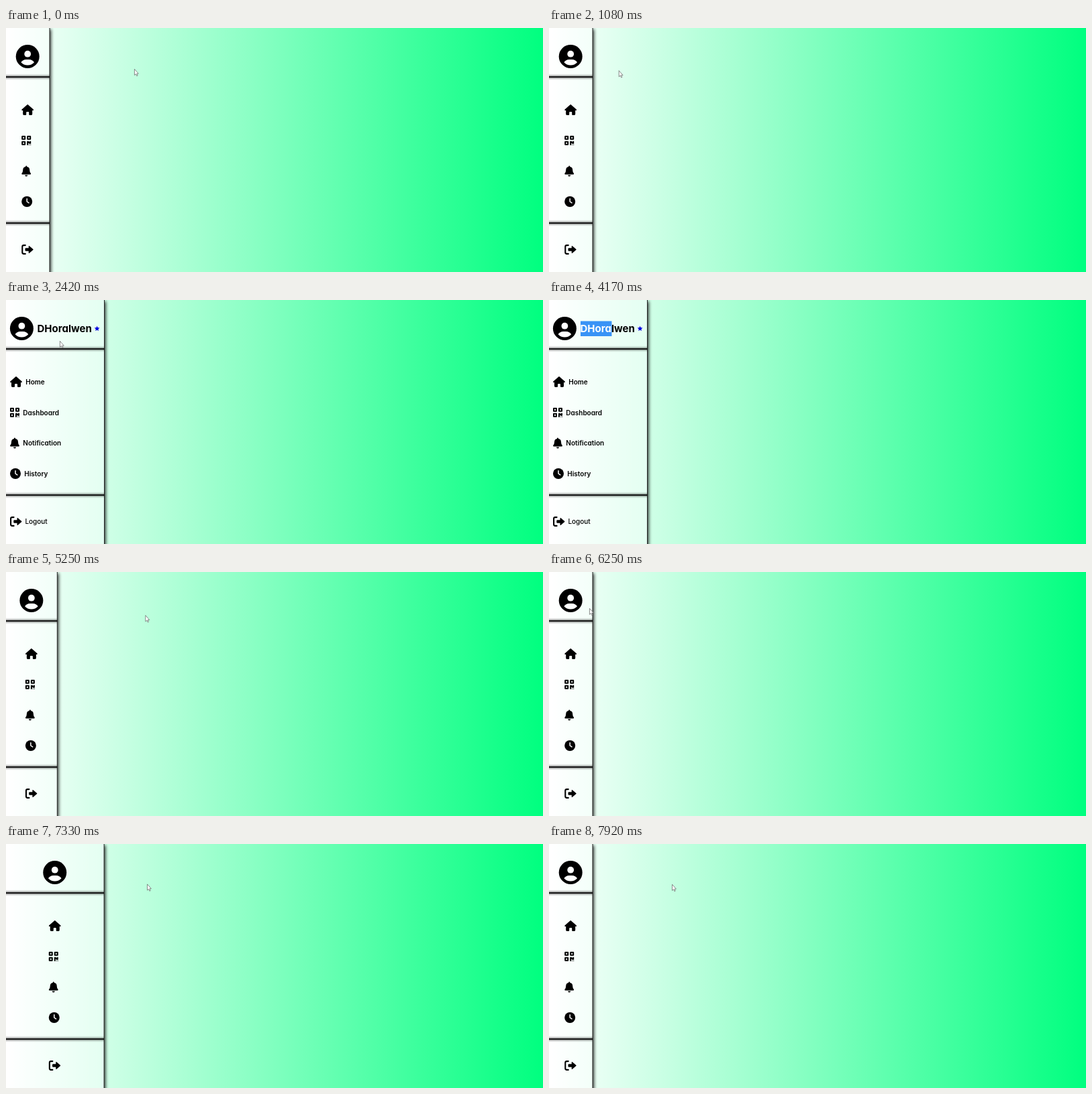
Animation, 800 px wide and 364 px high, one loop 8000 ms. Source, as an HTML page:

```html
<!DOCTYPE html>
<html lang="en">
<head>
<meta charset="utf-8">
<title>Sidebar</title>
<style>
  html, body { margin: 0; width: 100%; height: 100%; overflow: hidden; }
  svg { display: block; width: 100vw; height: 100vh; }
  text { font-family: Inter, "Open Sans", sans-serif; font-size: 10px; font-weight: 600; font-feature-settings: "cv11"; }
  #name { font-size: 15px; font-weight: 700; }
</style>
</head>
<body>
<svg viewBox="0 0 800 364">
  <defs>
    <linearGradient id="mint"><stop stop-color="#fff"/><stop offset="1" stop-color="#00ff7f"/></linearGradient>
    <filter id="soft" filterUnits="userSpaceOnUse" x="-20" y="-20" width="840" height="404"><feGaussianBlur stdDeviation="2.6"/></filter>
    <filter id="thin" filterUnits="userSpaceOnUse" x="-20" y="-20" width="840" height="404"><feGaussianBlur stdDeviation="1.6"/></filter>
    <clipPath id="outside"><rect id="outer" width="800" height="364"/></clipPath>
    <clipPath id="inside"><rect id="inner" height="364"/></clipPath>
  </defs>

  <rect width="800" height="364" fill="url(#mint)"/>
  <g clip-path="url(#outside)">
    <rect id="shade" x="-10" y="2" height="380" opacity=".85" filter="url(#soft)"/>
  </g>
  <rect id="panel" height="364" fill="#fff" fill-opacity=".4"/>
  <rect id="edge" width="1" height="364" fill="#222"/>
  <g id="rules" clip-path="url(#inside)"></g>

  <g id="icons">
    <g transform="translate(0 25)">
      <circle cx="17.5" cy="17.5" r="17.5"/>
      <g fill="#fff">
        <circle cx="17.5" cy="13.7" r="4.9"/>
        <path d="M7.7 26.3C9.2 23.6 12.1 21.9 15.3 21.9H19.7C22.9 21.9 25.8 23.6 27.3 26.3C24.9 28.9 21.4 30.6 17.5 30.6S10.1 28.9 7.7 26.3Z"/>
      </g>
    </g>
    <g transform="translate(0 114)">
      <path d="M8.3 .4Q9 -.2 9.7 .4L17.7 7.5Q18.4 9 17 9H16V14.6Q16 16 14.6 16H12Q11 16 11 15V12Q11 11 10 11H8Q7 11 7 12V15Q7 16 6 16H3.4Q2 16 2 14.6V9H1Q-.4 9 .3 7.5Z"/>
    </g>
    <g transform="translate(0 160.8)">
      <path fill="none" stroke="#000" stroke-width="2" stroke-linejoin="round" d="M1 1h4v4h-4zM9 1h4v4h-4zM1 9h4v4h-4z"/>
      <path d="M8 8h3v1h1V8h2v4h-3v-1h-1v3H8zM11 13h1v1h-1zM13 13h1v1h-1z"/>
    </g>
    <g transform="translate(0 205.4)">
      <path d="M7 0Q8 0 8 1V1.6Q12 2.4 12 6.5Q12 9.5 13.7 11.3Q14.5 13 13 13H1Q-.5 13 .3 11.3Q2 9.5 2 6.5Q2 2.4 6 1.6V1Q6 0 7 0ZM5 14H9A2 2 0 0 1 5 14Z"/>
    </g>
    <g transform="translate(0 251)">
      <circle cx="8" cy="8" r="8"/>
      <path d="M8 3.7V8L10.8 9.9" fill="none" stroke="#fff" stroke-width="1.5" stroke-linecap="round" stroke-linejoin="round"/>
    </g>
    <g transform="translate(0 323)">
      <path fill="none" stroke="#000" stroke-width="2.1" stroke-linecap="round" d="M5.6 1.1H3.2Q1.1 1.1 1.1 3.2V11.8Q1.1 13.9 3.2 13.9H5.6"/>
      <path d="M6.3 5.2H10.5V2.9Q10.5 1.4 11.7 2.3L17.2 6.9Q17.8 7.5 17.2 8.1L11.7 12.7Q10.5 13.6 10.5 12.1V9.8H6.3Q5.3 9.8 5.3 8.8V6.2Q5.3 5.2 6.3 5.2Z"/>
    </g>
  </g>

  <g id="labels">
    <rect id="mark" x="47" y="31.5" height="22.5" fill="#3993f6"/>
    <text id="name" x="46.5" y="47.8"><tspan id="picked" fill="#fff"></tspan><tspan id="rest"></tspan></text>
    <path id="star" fill="#0000e0"/>
    <text x="29.2" y="126">Home</text>
    <text x="25.3" y="171.7">Dashboard</text>
    <text x="25.3" y="217.2">Notification</text>
    <text x="27.3" y="262.8">History</text>
    <text x="28.4" y="334" style="font-weight:500">Logout</text>
  </g>

  <path id="arrow" d="M.4 .3V9.4L2.4 7.6L3.8 10.6L5.1 10L3.8 7.1H6.3Z" fill="#fff" stroke="#666" stroke-width=".75" stroke-linejoin="round"/>
</svg>
<script>
const LOOP = 8000, STEP = 1000 / 12;
const SLIM = 65, WIDE = 146.5, SLIDE = 300;
const USER = "DHoralwen";
const HOVERS = [[1683, 5080], [6300, 7330]];
const DRAG = 3870, DRAG_TIME = 520;

// time, x, y
const PATH = [
  [0, 191, 61], [833, 120, 63], [1667, 66, 64], [1833, 60, 63],
  [2417, 80, 61], [2583, 84, 62], [2850, 121, 66], [3240, 49, 53],
  [4750, 112, 54], [4917, 137, 67], [5083, 175, 66], [5500, 256, 62],
  [5667, 256, 62], [6250, 60, 54], [6500, 48, 53], [6667, 44, 53],
  [6833, 44, 53], [7250, 125, 62], [7333, 210, 59.6], [7500, 252, 60],
  [7750, 252, 60], [7917, 183, 60]
];

const $ = id => document.getElementById(id);
const set = (id, key, value) => $(id).setAttribute(key, value);
const show = (id, on) => set(id, "visibility", on ? "visible" : "hidden");
const clamp = (v, lo, hi) => Math.min(hi, Math.max(lo, v));

$("rules").innerHTML = [73, 291].map(y =>
  `<rect x="-5" y="${y - 2}" width="300" height="4" opacity=".55" filter="url(#thin)"/>
   <rect y="${y - .8}" width="300" height="1.6"/>`).join("");

const tips = Array.from({ length: 10 }, (_, i) => {
  const a = i * Math.PI / 5, r = i % 2 ? 1.9 : 4.1;
  return [135.6 + r * Math.sin(a), 42.8 - r * Math.cos(a)];
});
set("star", "d", "M" + tips.join("L") + "Z");

// cubic-bezier(.25, .1, .25, 1)
function ease(x) {
  if (x <= 0 || x >= 1) return clamp(x, 0, 1);
  const curve = (s, a, b) => 3 * s * (1 - s) ** 2 * a + 3 * s * s * (1 - s) * b + s ** 3;
  let lo = 0, hi = 1;
  for (let i = 0; i < 24; i++) {
    const mid = (lo + hi) / 2;
    if (curve(mid, .25, .25) < x) lo = mid; else hi = mid;
  }
  return curve(lo, .1, 1);
}

function panelState(t) {
  let open = false, grow = 0;
  for (const [enter, leave] of HOVERS) {
    if (t >= enter && t < leave) open = true;
    grow += ease((t - enter) / SLIDE) - ease((t - leave) / SLIDE);
  }
  return { open, width: SLIM + (WIDE - SLIM) * grow };
}

function pointerAt(t) {
  const next = PATH.findIndex(p => p[0] > t);
  if (next < 0) return PATH[PATH.length - 1].slice(1);
  const [t0, x0, y0] = PATH[next - 1], [t1, x1, y1] = PATH[next];
  const k = (t - t0) / (t1 - t0);
  return [x0 + (x1 - x0) * k, y0 + (y1 - y0) * k];
}

function select(t) {
  const count = clamp(Math.round(USER.length * (t - DRAG) / DRAG_TIME), 0, USER.length);
  $("picked").textContent = USER.slice(0, count);
  $("rest").textContent = USER.slice(count);
  set("mark", "width", count ? $("picked").getComputedTextLength() : 0);
}

function draw(now) {
  const t = Math.floor((now % LOOP + 4) / STEP) % 96 * STEP;
  const { open, width } = panelState(t);
  set("panel", "width", width);
  set("inner", "width", width);
  set("outer", "x", width);
  set("shade", "width", width + 12);
  set("edge", "x", width - .5);

  [...$("icons").children].forEach((icon, i) => {
    const y = icon.transform.baseVal.getItem(0).matrix.f;
    const x = i ? (open ? 6 : width / 2 - 9.3) : (open ? 5.9 : width / 2 - 17.8);
    icon.setAttribute("transform", `translate(${x} ${y})`);
  });

  select(t);
  set("labels", "display", open ? "inline" : "none");
  set("arrow", "transform", `translate(${pointerAt(t)})`);
  show("arrow", t < 3245 || t > 4745);
}

const start = performance.now();
function tick() {
  draw(performance.now() - start);
  requestAnimationFrame(tick);
}
tick();
</script>
</body>
</html>
```
